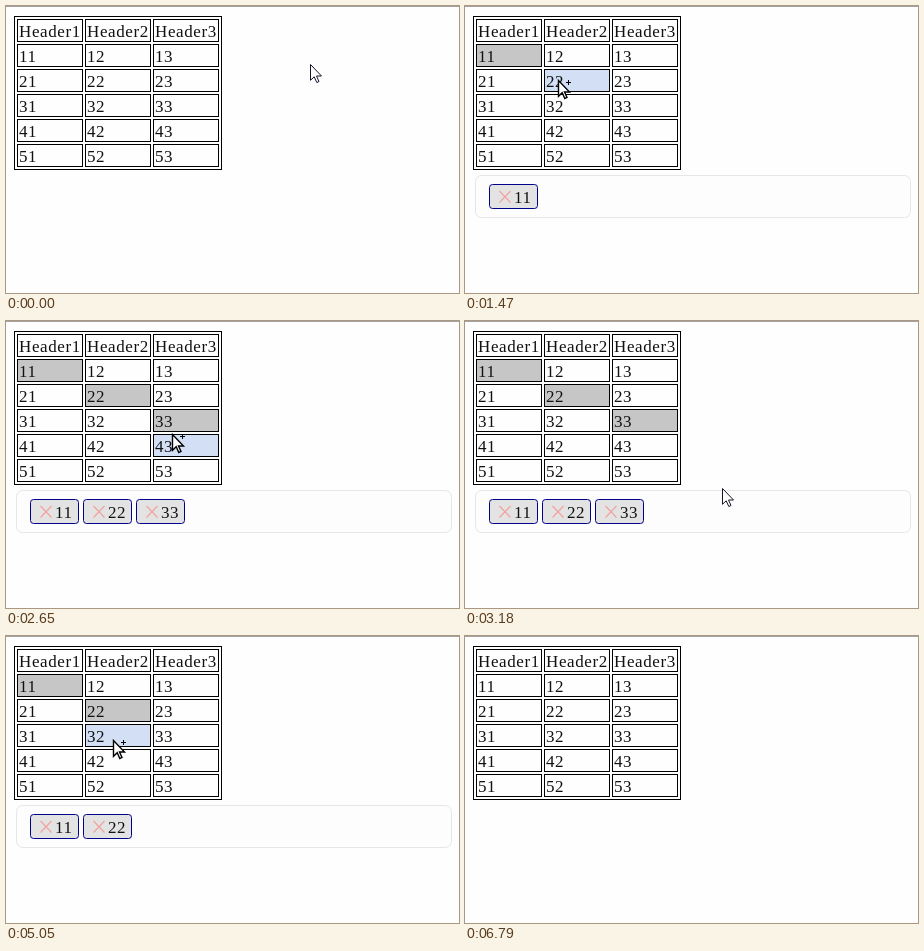
These frames come from a looping animation (453 by 287 pixels, 7410 ms). An HTML page:

```html
<!DOCTYPE html>
<html lang="en">
<head>
<meta charset="utf-8">
<title>Cell picker</title>
<style>
  html, body { margin: 0; width: 100%; height: 100%; overflow: hidden; background: #fefefe; }
  svg { display: block; width: 453px; height: 287px; }
  text { font: 17px "Liberation Serif", "Noto Serif", serif; letter-spacing: .6px; fill: #111; }
  .frame { fill: none; stroke: #000; shape-rendering: crispEdges; }
  .cell { fill: #fefefe; stroke: #000; shape-rendering: crispEdges; }
  .cell.hover { fill: #d3dff5; }
  .cell.picked { fill: #c6c6c6; }
  .panel { fill: #fdfdfd; stroke: #e6e6e6; }
  .tag { fill: #e3e3e3; stroke: #00008b; }
  .cross { fill: none; stroke: #f0a3a0; stroke-width: 1.2; }
  .arrow { fill: #fff; stroke: #15152a; }
  .copy .arrow { stroke: #000; stroke-width: 1.4; }
  .plus { fill: none; stroke: #000; shape-rendering: crispEdges; visibility: hidden; }
  .copy .plus { visibility: visible; }
</style>
</head>
<body>
<svg id="stage" viewBox="0 0 453 287"></svg>
<script>
const LOOP = 7410, BEAT = 132;
const COLS = 3, ROWS = 5;
const CELL_W = 66, CELL_H = 23;
const colX = c => 11 + 68 * c;
const rowY = r => 13 + 25 * r;

// pointer stops: beat of arrival, place, beats of rest
const STOPS = [
  { at: 0, x: 304, y: 58, rest: 1 },
  { at: 7, x: 58, y: 48, rest: 2 },
  { at: 11, x: 93, y: 74, rest: 1 },
  { at: 14, x: 158, y: 90, rest: 3 },
  { at: 20, x: 166, y: 113 },
  { at: 24, x: 257, y: 167 },
  { at: 29, x: 185, y: 192 },
  { at: 31, x: 140, y: 192, rest: 1 },
  { at: 36, x: 100, y: 179 },
  { at: 38, x: 107, y: 104, rest: 1 },
  { at: 42, x: 108, y: 82, rest: 1 },
  { at: 46, x: 65, y: 64 },
  { at: 47, x: 58, y: 50, rest: 1 },
  { at: 50, x: 349, y: 275 }
];
const LEAVE = 51;

// beats in which each diagonal cell is picked
const PICKS = [{ on: 9, off: 48 }, { on: 12, off: 42 }, { on: 16, off: 32 }];

const stage = document.getElementById("stage");

function add(parent, name, attrs = {}, label) {
  const el = document.createElementNS("http://www.w3.org/2000/svg", name);
  for (const key in attrs) el.setAttribute(key, attrs[key]);
  if (label) el.textContent = label;
  return parent.appendChild(el);
}

function box(parent, cls, x, y, w, h, rx = 0) {
  return add(parent, "rect", { class: cls, x: x + .5, y: y + .5, width: w - 1, height: h - 1, rx });
}

add(stage, "rect", { width: 453, height: 1, fill: "#a3a3a3" });
box(stage, "frame", 8, 10, 208, 154);

const cells = [];
for (let r = 0; r <= ROWS; r++) {
  for (let c = 0; c < COLS; c++) {
    const rect = box(stage, "cell", colX(c), rowY(r), CELL_W, CELL_H);
    const label = r ? `${r}${c + 1}` : `Header${c + 1}`;
    add(stage, "text", { x: colX(c) + 2, y: rowY(r) + 18 }, label);
    if (r) cells.push({ rect, r, c });
  }
}

const panel = add(stage, "g");
box(panel, "panel", 10, 169, 436, 43, 6);
const tags = PICKS.map((_, i) => {
  const g = add(panel, "g", { transform: `translate(${24 + 53 * i} 178)` });
  box(g, "tag", 0, 0, 49, 25, 3);
  add(g, "path", { class: "cross", d: "M10.5 7l11 11.5M21.5 7l-11 11.5" });
  add(g, "text", { x: 25, y: 19 }, `${i + 1}${i + 1}`);
  return g;
});

const pointer = add(stage, "g");
add(pointer, "path", {
  class: "arrow",
  d: "M.5 .5V16.3L4.2 12.8 6.8 18.5 9 17.5 6.5 12H11.5Z"
});
add(pointer, "path", { class: "plus", d: "M8 2.5h5M10.5 0v5" });

const show = (el, on) => { el.style.display = on ? "" : "none"; };
const easeOut = k => 1 - (1 - k) ** 2;

function pointerAt(beat) {
  const i = STOPS.findLastIndex(s => s.at <= beat);
  const from = STOPS[i], to = STOPS[i + 1] || from;
  const leave = from.at + (from.rest || 0);
  const k = beat > leave && to !== from ? easeOut((beat - leave) / (to.at - leave)) : 0;
  const mix = (a, b) => Math.round(a + (b - a) * k);
  return { x: mix(from.x, to.x), y: mix(from.y, to.y) };
}

function draw(t) {
  const beat = Math.floor(t / BEAT);
  const { x, y } = pointerAt(beat);
  const picked = PICKS.map(p => beat >= p.on && beat < p.off);
  let overCell = false;
  for (const { rect, r, c } of cells) {
    const dx = x - colX(c), dy = y - rowY(r);
    const over = dx >= 0 && dx < CELL_W && dy >= 0 && dy < CELL_H;
    const state = r === c + 1 && picked[c] ? " picked" : over ? " hover" : "";
    overCell = overCell || over;
    rect.setAttribute("class", "cell" + state);
  }
  show(panel, picked.includes(true));
  tags.forEach((tag, i) => show(tag, picked[i]));
  show(pointer, beat < LEAVE);
  pointer.setAttribute("class", overCell ? "copy" : "");
  pointer.setAttribute("transform", `translate(${x} ${y})`);
}

const start = performance.now();
function tick(now) {
  draw(Math.max(0, now - start) % LOOP);
  requestAnimationFrame(tick);
}
draw(0);
requestAnimationFrame(tick);
</script>
</body>
</html>
```
